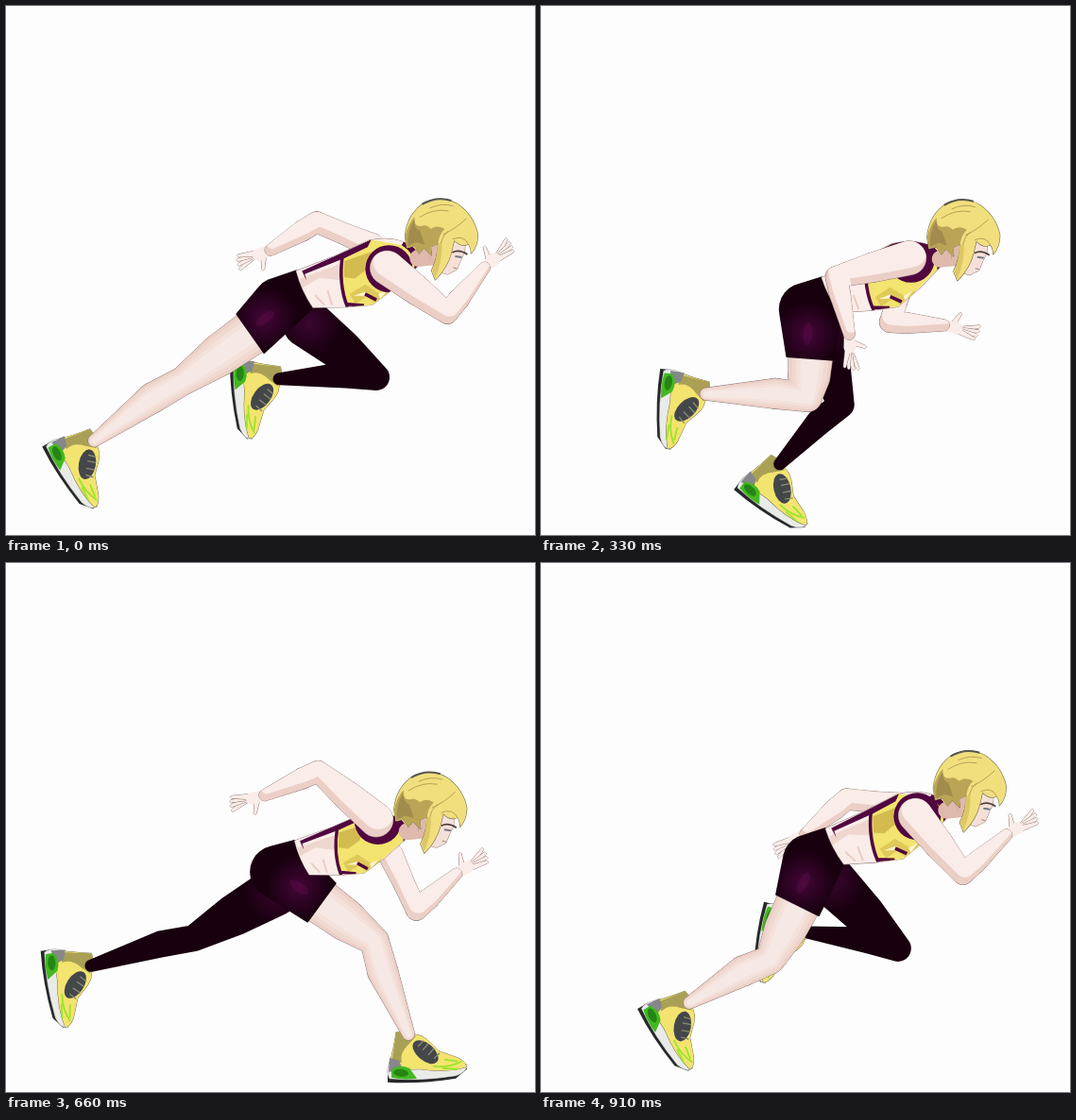
Write an HTML page with a canvas that moves like this. It is 560 by 560 pixels and loops after 1 s.

```html
<!DOCTYPE html>
<html lang="en">
<head>
<meta charset="utf-8">
<title>Runner</title>
<style>
html, body { margin: 0; width: 100%; height: 100%; overflow: hidden; background: #fdfdfd; }
canvas { display: block; width: 560px; height: 560px; }
</style>
</head>
<body>
<canvas id="stage" width="560" height="560"></canvas>
<script>
const ctx = document.getElementById('stage').getContext('2d');
const STEPS = 12, LOOP = 1000;

// One stride, shared by both legs half a cycle apart:
// step, knee x y from the waist, shin angle and length, foot angle
const STRIDE = [
  [0, -130, 97, 146, 113, 60], [2, -115, 85, 165, 113, 83], [3, -89, 109, 174, 117, 89],
  [5, 38, 108, 190, 98, 102], [6, 54, 93, 179, 103, 87], [8, 76, 88, 70, 105, 0],
  [9, 47, 112, 120, 84, 15], [11, -69, 120, 152, 97, 60]];
// step, upper arm angle, forearm angle
const NEAR_SWING = [[0, 37, -51], [2, 67, -46], [3, 132, 18], [5, 199, 136], [8, 220, 156], [9, 218, 139], [11, 51, -42]];
const FAR_SWING = [[0, 203, 149], [2, 194, 145], [3, 163, 39], [5, 54, -32], [8, 65, -42], [9, 85, -15], [11, 186, 140]];

const SKIN = '#faece8', SHADE = '#ebcfc6', DARK = '#18000f', PLUM = '#500740';
const YELLOW = '#f3e36f', OCHRE = '#d3bb50', LINE = '#8a7672';

const lerp = (a, b, k) => a + (b - a) * k;
const mix = (a, b, k) => [lerp(a[0], b[0], k), lerp(a[1], b[1], k)];
const add = (a, x, y) => [a[0] + x, a[1] + y];
const rad = d => d * Math.PI / 180;
const polar = (p, len, deg) => add(p, len * Math.cos(rad(deg)), len * Math.sin(rad(deg)));
const wave = (step, amp, peak, period = STEPS) => amp * Math.cos(2 * Math.PI * (step - peak) / period);

// Values of a cyclic key list at a step
function sample(keys, step) {
  let i = keys.length - 1;
  while (keys[i][0] > step) i--;
  const a = keys[i], b = keys[(i + 1) % keys.length];
  const span = (b[0] - a[0] + STEPS) % STEPS;
  return a.slice(1).map((v, n) => lerp(v, b[n + 1], (step - a[0]) / span));
}

// Adds the convex hull of circles [x, y, r] to a path
function hull(path, circles) {
  const pts = [];
  for (const [x, y, r] of circles)
    for (let i = 0; i < 28; i++) pts.push(polar([x, y], r, i * 360 / 28));
  pts.sort((a, b) => a[0] - b[0] || a[1] - b[1]);
  const half = list => {
    const out = [];
    for (const p of list) {
      while (out.length > 1) {
        const a = out[out.length - 2], b = out[out.length - 1];
        if ((b[0] - a[0]) * (p[1] - a[1]) - (b[1] - a[1]) * (p[0] - a[0]) > 0) break;
        out.pop();
      }
      out.push(p);
    }
    return out.slice(0, -1);
  };
  [...half(pts), ...half(pts.reverse())].forEach((p, i) => i ? path.lineTo(...p) : path.moveTo(...p));
  path.closePath();
}

function limb(circles, scale = 1) {
  const path = new Path2D(), c = circles.map(([x, y, r]) => [x, y, r * scale]);
  for (let i = 1; i < c.length; i++) hull(path, [c[i - 1], c[i]]);
  return path;
}

function paint(path, fill, line, width = 1.3) {
  if (line) {
    ctx.strokeStyle = line;
    ctx.lineWidth = width;
    ctx.stroke(path);
  }
  ctx.fillStyle = fill;
  ctx.fill(path);
}

const shape = (d, fill, line, width) => paint(new Path2D(d), fill, line, width);

function stroke(d, color, width) {
  ctx.strokeStyle = color;
  ctx.lineWidth = width;
  ctx.stroke(new Path2D(d));
}

function ellipse(x, y, rx, ry, deg, fill) {
  const p = new Path2D();
  p.ellipse(x, y, rx, ry, rad(deg), 0, 7);
  paint(p, fill);
}

function glow([x, y], r, inner, path) {
  const g = ctx.createRadialGradient(x, y, 0, x, y, r);
  g.addColorStop(0, inner);
  g.addColorStop(1, DARK);
  paint(path, g);
}

function at(x, y, draw) {
  ctx.save();
  ctx.translate(x, y);
  draw();
  ctx.restore();
}

function shoe([x, y], deg) {
  at(x, y, () => {
    ctx.rotate(rad(deg));
    ctx.translate(2, 0);
    shape('M-24 38L-24 51Q10 53 48 47L60 37L58 33L20 42Z', '#26282a');
    shape('M-22 30Q-26 40-22 47Q10 50 48 44Q60 40 60 32L20 34Z', '#e9ebe8', '#999', 1);
    shape('M-15-2Q-18 18-22 30L-20 38L10 37Q38 41 59 35Q60 30 50 25L30 18L18 6L12 2L-8-3Z', YELLOW, '#777258', 1);
    shape('M-15-2Q-17 14-20 30L-9 30Q-12 20-2 11L6 2L-8-3Z', '#aaa055');
    shape('M-22 25L-12 28L-8 38L-23 40Z', '#85878a');
    shape('M-20 38Q-12 31-1 36L7 47Q-8 49-20 46Z', '#43b81f');
    ellipse(-10, 41, 8, 4, 5, '#248516');
    ellipse(16, 19, 16, 9, 40, '#43474a');
    stroke('M8 13L14 7M13 17L19 10M19 22L25 15M25 26L31 20', '#868a70', 1.4);
    stroke('M24 34Q40 36 54 29M34 36L50 37M36 27L50 29', '#9be52a', 1.8);
  });
}

function legPose(step, waist, shift) {
  const [kx, ky, shin, length, foot] = sample(STRIDE, step);
  const knee = add(waist, kx + shift, ky), ankle = polar(knee, length, shin);
  const calf = polar(mix(knee, ankle, .32), 3, shin + 90);
  return { knee, ankle, calf, foot };
}

function farLeg(pose, hip) {
  shoe(pose.ankle, pose.foot);
  const bones = [[...hip, 26], [...mix(hip, pose.knee, .5), 22], [...pose.knee, 14], [...pose.calf, 14], [...pose.ankle, 6.5]];
  glow(add(hip, 2, 0), 34, '#3a0630', limb(bones));
}

function nearLeg(pose, waist, top, low) {
  const { knee, ankle, calf, foot } = pose;
  const hip = add(waist, -19, 19);
  const deg = Math.atan2(knee[1] - hip[1], knee[0] - hip[0]) * 180 / Math.PI;
  const cut = polar(hip, 48, deg);
  const bones = [[...polar(hip, 38, deg), 24], [...mix(cut, knee, .45), 22], [...knee, 15], [...calf, 16], [...ankle, 6.5]];
  shoe(ankle, foot);
  paint(limb(bones), '#ecd0c7', LINE, 1);
  ['#f0d9d1', '#f4e1da', '#f6e8e4'].forEach((c, i) => paint(limb(bones, .84 - i * .2), c));
  const seat = add(waist, -28, 15), path = new Path2D();
  hull(path, [[...top, 1], [...low, 1], [...seat, 28], [...polar(cut, 25, deg + 90), 1], [...polar(cut, 25, deg - 90), 1]]);
  const shine = mix(seat, cut, .5);
  glow(shine, 34, '#430638', path);
  ellipse(...shine, 12, 5, deg, 'rgba(105,18,84,.3)');
}

function hand(wrist, deg) {
  const palm = polar(wrist, 14, deg);
  const finger = (from, a, len) => {
    const base = polar(from, 4, a + 20), tip = polar(from, len, a);
    paint(limb([[...base, 2.8], [...tip, 1.4]]), SKIN, LINE, 1);
  };
  finger(polar(wrist, 6, deg), deg - 62, 18);
  for (let i = 0; i < 4; i++) finger(palm, deg - 18 + i * 12, 24 - i);
  paint(limb([[...wrist, 5.5], [...palm, 6.5]]), SKIN);
}

function arm([upper, fore], shoulder, girth, upperLength, foreLength) {
  const elbow = polar(shoulder, upperLength, upper), wrist = polar(elbow, foreLength, fore);
  hand(wrist, fore + 10);
  const bones = [[...shoulder, girth], [...mix(shoulder, elbow, .5), girth * .86], [...elbow, 11],
    [...mix(elbow, wrist, .3), 11], [...wrist, 6]];
  const path = limb(bones);
  paint(path, SHADE, LINE, 1);
  ctx.save();
  ctx.clip(path);
  ctx.translate(2, -7);
  paint(limb(bones, .94), SKIN);
  ctx.restore();
}

// Maps the drawn torso, waist (320,302) to neck (434,264), onto the pose
function torsoMatrix([wx, wy], [nx, ny]) {
  const ux = 114, uy = -38, n = ux * ux + uy * uy, vx = nx - wx, vy = ny - wy;
  const a = (vx * ux + vy * uy) / n, b = (vy * ux - vx * uy) / n;
  return new DOMMatrix([a, b, -b, a, wx - a * 320 + b * 302, wy - b * 320 - a * 302]);
}

function torso(m, shoulder) {
  const skin = new Path2D('M310 283L350 267L386 250Q412 244 434 257L440 273L413 299L390 317L362 320L328 321Q316 304 310 283Z');
  ctx.save();
  ctx.transform(m.a, m.b, m.c, m.d, m.e, m.f);
  paint(skin, SKIN, LINE, 1);
  ctx.clip(skin);
  shape('M314 291L358 274L357 292L334 290L316 301Z', '#eed6ce');
  stroke('M330 308L340 318M343 303L348 318', '#eacdc4', 2);
  shape('M358 268L386 249L434 257L440 273L412 299L388 320L363 319Q356 296 358 268Z', YELLOW);
  shape('M360 272L388 262L384 280L371 290L360 289Z', OCHRE);
  shape('M366 306L382 296L398 306L410 300L396 318L384 309L372 316Z', '#dfc958');
  shape('M370 308L382 304L389 309L380 308Z M396 306L406 301L398 311Z', '#fff7cf');
  shape('M316 283L350 267L388 249L384 257L360 269L319 286L321 293Z', PLUM);
  stroke('M358 266Q354 296 364 320M364 317L381 318M382 306L394 312', PLUM, 3.5);
  stroke('M421 252Q438 262 436 280', PLUM, 6);
  ctx.restore();
  ctx.save();
  const world = new Path2D();
  world.addPath(skin, m);
  ctx.clip(world);
  ellipse(shoulder[0] + 2, shoulder[1] + 1, 25, 25, 0, PLUM);
  ctx.restore();
}

function head(neck) {
  const [x, y] = add(neck, -13, -59);
  paint(limb([[...add(neck, 3, 4), 9], [x + 36, y + 60, 10]]), '#dfb9ac');
  at(x, y, () => {
    shape('M28 40L66 42L65 57L61 65L57 75L47 80L36 77L28 62Z', '#f5e0d9', LINE, 1);
    shape('M28 42L42 46L46 65L38 78L28 66Z', '#dfb9ac');
    stroke('M52 57Q59 53 68 59', '#4a3d3a', 1.7);
    stroke('M55 61L62 62', '#737986', 2);
    stroke('M53 73L57 74', '#a5776b', 1);
    shape('M2 40Q4 16 23 4Q42-4 58 6Q75 18 79 38Q79 50 72 58Q72 52 69 48Q62 52 54 44L51 57Q47 73 34 86L30 76Q37 62 37 47L29 51L30 60L22 52L17 58L12 50L4 52Z', '#f1df7d', '#77704d', 1.2);
    shape('M2 40Q5 27 12 19Q11 30 19 29Q25 27 29 32Q36 27 44 32Q38 38 37 47L29 51L30 60L22 52L17 58L12 50L4 52Z', '#bba455');
    shape('M12 22Q11 32 18 34L23 49L14 46L5 50Q4 34 12 22Z', '#a18c4d');
    shape('M36 50L41 45Q42 66 34 84L31 76Q36 64 36 50Z', '#dcc667');
    stroke('M20 6Q35-3 51 2', '#56574d', 2);
    stroke('M28 10Q42 4 53 8M17 20Q32 10 48 13M42 38Q54 33 67 21M52 43Q64 38 69 48M40 47Q41 40 48 34', '#b9a155', 1);
  });
}

function draw(step) {
  const waist = [313 + wave(step, 6, .5) + wave(step, 5.5, 1.8, 6), 306 + wave(step, 7, 2.5, 6)];
  const neck = add(waist, 112 + wave(step, 5, 1), -37 + wave(step, 6, 1.5, 6));
  const nearShoulder = add(neck, -30, 3 + wave(step, 13, 1));
  const farShoulder = add(neck, -30 - wave(step, 18, 1), 10 - wave(step, 22, 1));
  const farHip = add(waist, -14 + wave(step, 18, 1), 36);
  const twist = 14 + wave(step, 14, 5, 6);
  const m = torsoMatrix(waist, neck);
  const spot = (x, y) => {
    const p = m.transformPoint({ x, y });
    return [p.x, p.y];
  };
  ctx.fillStyle = '#fdfdfd';
  ctx.fillRect(0, 0, 560, 560);
  ctx.lineJoin = 'round';
  arm(sample(FAR_SWING, step), farShoulder, 13, 64, 57);
  farLeg(legPose((step + STEPS / 2) % STEPS, waist, twist), farHip);
  nearLeg(legPose(step, waist, 0), waist, spot(310, 283), spot(328, 321));
  torso(m, nearShoulder);
  head(neck);
  arm(sample(NEAR_SWING, step), nearShoulder, 18, 80, 62);
}

// Step times fall on whole hundredths of a second
const stepStart = i => Math.floor(i * LOOP / STEPS / 10) * 10;

let shown = -1;
function tick() {
  const t = performance.now() % LOOP;
  let step = STEPS - 1;
  while (stepStart(step) > t) step--;
  if (step !== shown) draw(shown = step);
  requestAnimationFrame(tick);
}
tick();
</script>
</body>
</html>
```
